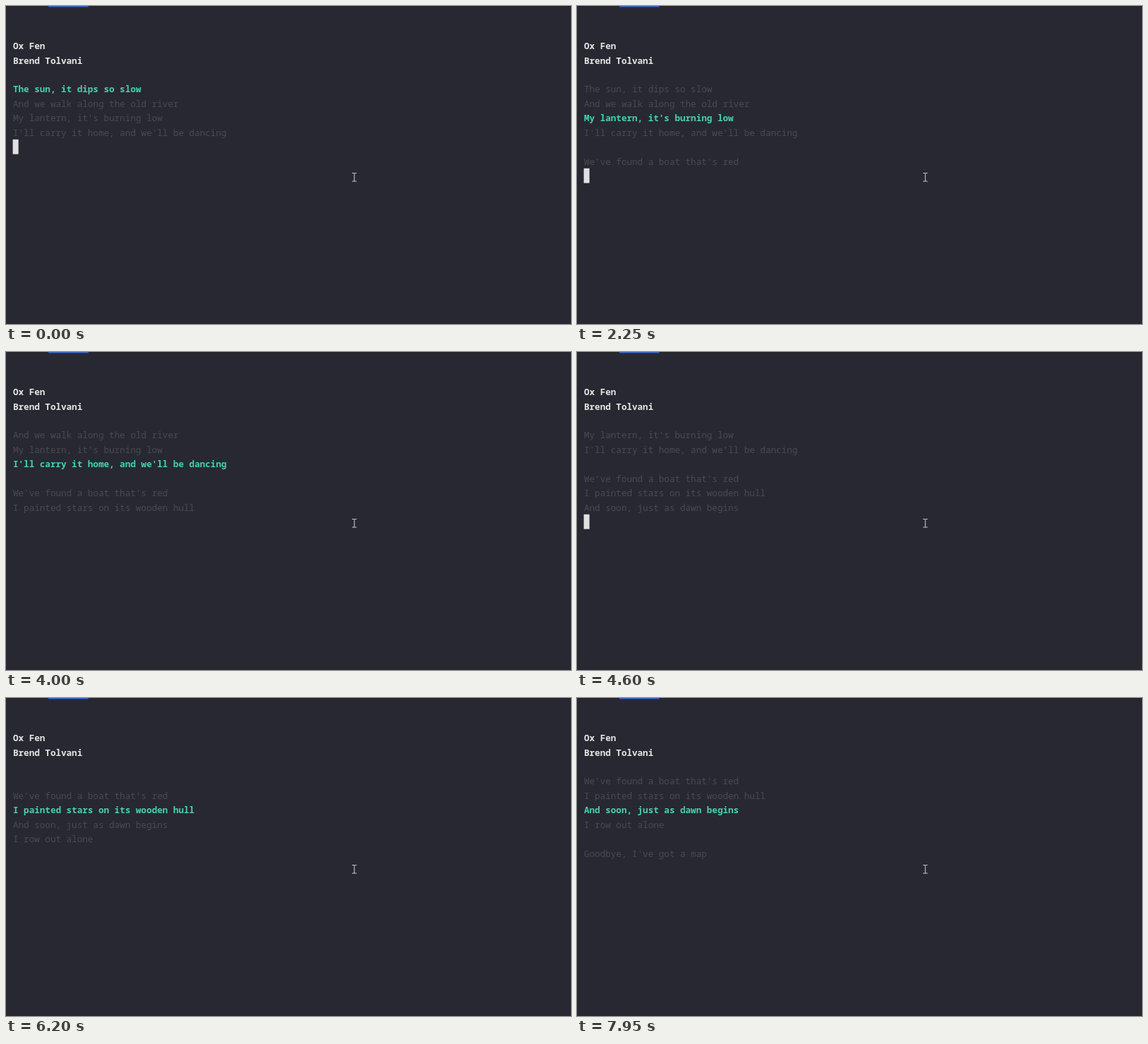
An HTML page for the animation above (8 s loop, 800 by 450 pixels).

```html
<!DOCTYPE html>
<html lang="en">
<head>
<meta charset="utf-8">
<title>Terminal lyrics</title>
<style>
  html, body { margin: 0; width: 100%; height: 100%; overflow: hidden; background: #282832; }
  svg { display: block; width: 800px; height: 450px; }
  text {
    font: 500 12.6px "Noto Sans Mono", "DejaVu Sans Mono", monospace;
    font-variant-ligatures: none;
    fill: #4a4a52;
  }
  .head { fill: #e6e6e4; font-weight: 600; }
  .active { fill: #47d1b1; font-weight: 700; }
</style>
</head>
<body>
<svg viewBox="0 0 800 450">
  <rect width="800" height="450" fill="#282832"/>
  <rect width="800" height="1" fill="#242427"/>
  <rect x="60" width="56.5" height="1.4" fill="#3b6bd2"/>
  <g id="rows"></g>
  <rect id="cursor" x="9.6" width="8" height="20.8" fill="#e1e1e3"/>
  <path d="M490 236.5h2.4l.8.6.8-.6h2.4M493.2 237v10.5M490 248h2.4l.8-.6.8.6h2.4"
        fill="none" stroke="#c4c4c8" stroke-width="1.1"/>
</svg>
<script>
  const LOOP = 8000;
  const TOP = 45.7, PITCH = 20.45, BASELINE = 15.4;
  const HEAD = ["Ox Fen", "Brend Tolvani", ""];
  const LYRICS = [
    "The sun, it dips so slow",
    "And we walk along the old river",
    "My lantern, it's burning low",
    "I'll carry it home, and we'll be dancing",
    "",
    "We've found a boat that's red",
    "I painted stars on its wooden hull",
    "And soon, just as dawn begins",
    "I row out alone",
    "",
    "Goodbye, I've got a map"
  ];
  const STEP = 1000, STEP_OFFSET = 150;
  const BLINK = 1057, BLINK_OFF = 400;

  const rows = document.getElementById("rows");
  const cursor = document.getElementById("cursor");
  const rowTop = row => TOP + row * PITCH;

  const lines = Array.from({ length: 9 }, (_, row) => {
    const line = document.createElementNS("http://www.w3.org/2000/svg", "text");
    line.setAttribute("x", 10);
    line.setAttribute("y", rowTop(row) + BASELINE);
    rows.append(line);
    return line;
  });

  let shown = -1;

  // Two lines of context above the active line, three below.
  function showLyrics(active) {
    if (active === shown) return;
    shown = active;
    const first = Math.max(0, active - 2);
    const screen = HEAD.concat(LYRICS.slice(first, active + 4));
    lines.forEach((line, row) => {
      const index = first + row - HEAD.length;
      line.textContent = screen[row] || "";
      line.setAttribute("class", row < HEAD.length ? "head" : index === active ? "active" : "");
    });
    cursor.setAttribute("y", rowTop(screen.length));
  }

  function draw(now) {
    const t = now % LOOP;
    showLyrics(Math.max(0, Math.floor((t - STEP_OFFSET) / STEP)));
    const phase = (t - BLINK_OFF + BLINK) % BLINK;
    cursor.setAttribute("visibility", phase < BLINK / 2 ? "hidden" : "visible");
  }

  const start = performance.now();
  function tick() {
    draw(performance.now() - start);
    requestAnimationFrame(tick);
  }
  tick();
</script>
</body>
</html>
```
